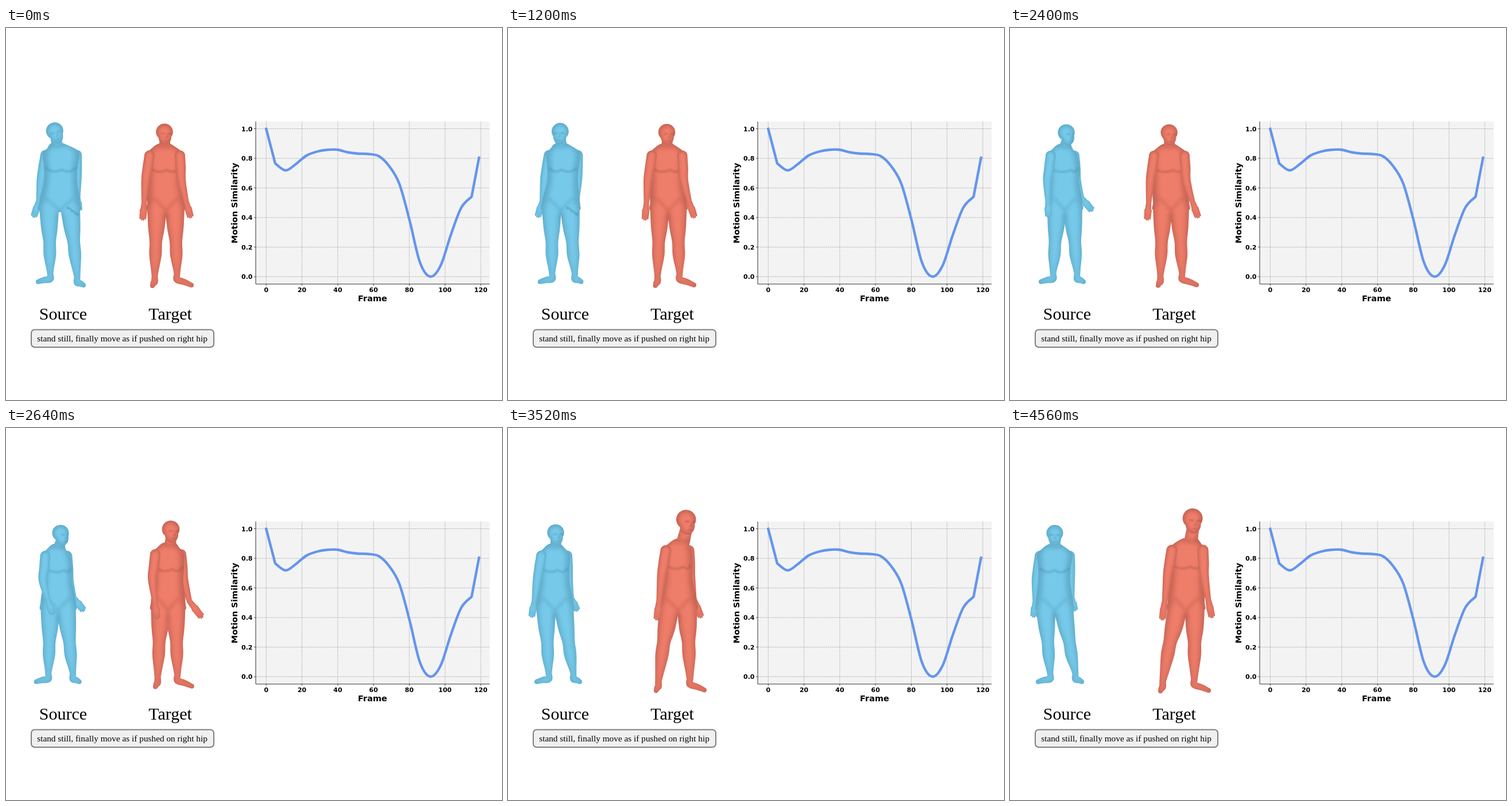
Animation, 864 px wide and 648 px high, one loop 4.8 s. Source, as an HTML page with a canvas:

```html
<!DOCTYPE html>
<html lang="en">
<head>
<meta charset="utf-8">
<title>Motion similarity</title>
<style>
html, body { margin: 0; width: 100%; height: 100%; overflow: hidden; background: #fff; }
canvas, svg { position: absolute; left: 0; top: 0; width: 864px; height: 648px; }
.tick { font: bold 11px "DejaVu Sans", sans-serif; }
.axis { font: bold 14.5px "DejaVu Sans", sans-serif; }
.name { font: 30px "Liberation Serif", serif; }
.note { font: 15.3px "Liberation Serif", serif; }
</style>
</head>
<body>
<canvas id="stage" width="864" height="648"></canvas>
<svg id="chart" viewBox="0 0 864 648"></svg>
<script>
const LOOP = 4800, STEP = 80;
const ctx = document.getElementById('stage').getContext('2d');
const lerp = (a, b, u) => a + (b - a) * u;

// ---------- chart and captions ----------
// curve heights at even steps between its two straight ends
const HEIGHTS = [236, 248, 237, 222.5, 215.5, 212.3, 212, 216.5, 218.8, 219.5,
  223, 240, 271, 335, 408, 433, 414, 360, 313, 294];

function smooth(pts) {
  return pts.slice(1).map((b, i) => {
    const a = pts[i], p = pts[i - 1] || a, n = pts[i + 2] || b;
    return `C${a[0] + (b[0] - p[0]) / 6} ${a[1] + (b[1] - p[1]) / 6} ` +
      `${b[0] - (n[0] - a[0]) / 6} ${b[1] - (n[1] - a[1]) / 6} ${b[0]} ${b[1]}`;
  }).join('');
}

function buildChart() {
  const text = (cls, x, y, s, anchor = 'middle', extra = '') =>
    `<text class="${cls}" x="${x}" y="${y}" text-anchor="${anchor}" ${extra}>${s}</text>`;
  const line = (d, color, w, extra = '') =>
    `<path d="${d}" fill="none" stroke="${color}" stroke-width="${w}" ${extra}/>`;
  const grid = d => line(d, '#aaa', .8, 'stroke-dasharray="2.6 1.1"');
  let s = '<rect x="435" y="163" width="407.5" height="283" fill="#f3f3f3"/>';
  for (let i = 0; i < 7; i++) {
    const x = 453.3 + 62.3 * i;
    s += grid(`M${x} 446V163`) + line(`M${x} 446v3`, '#222', .8) + text('tick', x, 460, i * 20);
  }
  for (let i = 0; i < 6; i++) {
    const y = 433.2 - 51.54 * i;
    s += grid(`M435 ${y}H842.5`) + line(`M435 ${y}h-3`, '#222', .8) +
      text('tick', 429.5, y + 4, (i / 5).toFixed(1), 'end');
  }
  s += line('M435 163V446H842.5', '#333', 1);
  s += line('M453.3 175.7L469 236' + smooth(HEIGHTS.map((y, i) => [469 + 18 * i, y])) + 'L824 226',
    '#6495ed', 4.4, 'stroke-linecap="square" stroke-linejoin="round"');
  s += text('axis', 638.5, 476, 'Frame');
  s += text('axis', 0, 0, 'Motion Similarity', 'middle', 'transform="translate(403 305) rotate(-90)"');
  s += text('name', 99.5, 508, 'Source') + text('name', 286, 508, 'Target');
  s += '<rect x="44" y="525.5" width="318" height="30.5" rx="6" fill="#f0f0f0" stroke="#7f7f7f" stroke-width="2"/>';
  s += text('note', 202.5, 546, 'stand still, finally move as if pushed on right hip');
  document.getElementById('chart').innerHTML = s;
}

// ---------- poses ----------
// time, head x, head y, yaw, then left and right x of shoulders, hips, fingertips, ankles
const BLUE = {
  rim: '#60acca', core: '#77c9ea', dark: '#34758f',
  handY: [330, 319], ankleY: 428, toe: [-21, 14, 11, 14],
  keys: [
    [0, 86, 183, .1, 64, 128, 58, 129, 48, 127, 77, 124],
    [720, 83, 184, -.6, 58, 119, 53, 118, 45, 112, 75, 115],
    [1760, 100, 184, .1, 76, 135, 66, 133, 59, 125, 79, 118],
    [2400, 98, 186, 1.2, 66, 117, 65, 126, 67, 144, 75, 117],
    [2960, 91, 188, 1.2, 60, 104, 54, 116, 101, 126, 72, 116],
    [3520, 83, 186, .6, 53, 108, 49, 114, 41, 121, 71, 114],
    [3920, 78, 187, 0, 47, 109, 45, 110, 41, 113, 70, 114]
  ]
};
const RED = {
  rim: '#c76556', core: '#ee7d69', dark: '#8a3c34', facing: true,
  handY: [335, 331], ankleY: 432, toe: [-4, 17, 25, 19],
  keys: [
    [0, 276, 185, .4, 245, 308, 246, 311, 238, 322, 259, 298],
    [2400, 277, 186, .6, 246, 309, 249, 312, 239, 328, 262, 300],
    [2960, 300, 173, .9, 267, 311, 257, 313, 296, 326, 267, 297],
    [3520, 310, 164, .9, 270, 320, 264, 329, 259, 337, 262, 317],
    [3920, 318, 162, .5, 277, 341, 275, 339, 265, 352, 266, 321]
  ]
};

function poseAt(keys, t) {
  const i = keys.findIndex(k => k[0] > t);
  if (i < 0) return keys[keys.length - 1];
  const a = keys[i - 1], b = keys[i];
  return a.map((v, j) => lerp(v, b[j], (t - a[0]) / (b[0] - a[0])));
}

// ---------- body ----------
const spline = (p, a, b, n, u) =>
  a + .5 * u * (b - p + u * (2 * p - 5 * a + 4 * b - n + u * (3 * (a - b) + n - p)));

// tapered tube through [x, y, radius] points
function tube(path, pts, k) {
  for (let i = 0; i < pts.length - 1; i++) {
    const p = pts[i - 1] || pts[i], a = pts[i], b = pts[i + 1], n = pts[i + 2] || b;
    for (let j = 0; j <= 20; j++) {
      const [x, y, r] = a.map((v, c) => spline(p[c], v, b[c], n[c], j / 20));
      path.moveTo(x + r * k, y);
      path.arc(x, y, r * k, 0, 7);
    }
  }
}

function arm(path, a, s, k) {
  const { sx, sy, ex, ey, tx, ty } = a;
  const wx = lerp(ex, tx, a.front ? .5 : .3), wy = lerp(ey, ty, .56);
  const px = lerp(wx, tx, .42), py = lerp(wy, ty, .42);
  tube(path, [[sx, sy, 9 * s], [lerp(sx, ex, .5), lerp(sy, ey, .5), 8.8 * s], [ex, ey, 7.6 * s], [wx, wy, 4.6 * s]], k);
  tube(path, [[wx, wy, 4.6 * s], [px, py, 5.6 * s]], k);
  const len = Math.hypot(tx - wx, ty - wy);
  const nx = (wy - ty) / len, ny = (tx - wx) / len;
  for (let f = -1.5; f < 2; f++) {
    const cut = .12 * Math.abs(f), off = f * 3;
    tube(path, [[px + nx * off, py + ny * off, 2],
      [lerp(tx, px, cut) + nx * off, lerp(ty, py, cut) + ny * off, 1.4]], k);
  }
}

function leg(path, hx, ax, ay, dx, dy, s, k) {
  const knee = lerp(hx, ax, .5);
  tube(path, [[hx, 314, 17], [lerp(hx, knee, .5), 346, 14.5 * s], [knee, 372, 11 * s],
    [lerp(knee, ax, .35), 395, 10.8 * s], [lerp(knee, ax, .8), lerp(372, ay, .8), 7 * s], [ax, ay, 5.3 * s]], k);
  tube(path, [[ax, ay, 5.3 * s], [ax, ay + 9, 6], [ax + dx / 2, ay + 4 + dy / 2, 5.4], [ax + dx, ay + dy, 4]], k);
}

// rows of [left, right, height fraction], narrowed by k
function trunk(path, rows, top, k) {
  const side = (l, r, f, sign) => [(l + r) / 2 + sign * k * (r - l) / 2, lerp(top, 320, f)];
  const p = [...rows.map(r => side(...r, 1)), ...rows.map(r => side(...r, -1)).reverse()];
  const n = p.length, loop = [p[n - 1], ...p, p[0], p[1]];
  const shape = smooth(loop.slice(1, -1));
  path.addPath(new Path2D(`M${p[0][0]} ${p[0][1]}` + shape));
}

// rim tone first, then a soft lighter core inside it
function solid(build, tone, blur, details) {
  const full = new Path2D(), core = new Path2D();
  build(full, 1);
  build(core, .72);
  ctx.fillStyle = tone.rim;
  ctx.fill(full);
  ctx.save();
  ctx.clip(full);
  ctx.filter = `blur(${blur}px)`;
  ctx.fillStyle = tone.core;
  ctx.fill(core);
  if (details) details();
  ctx.restore();
}

function crease(tone, alpha, width, d) {
  ctx.save();
  ctx.globalAlpha = alpha;
  ctx.filter = `blur(${width * .6}px)`;
  ctx.strokeStyle = tone.dark;
  ctx.lineWidth = width;
  ctx.lineCap = 'round';
  ctx.stroke(new Path2D(d));
  ctx.restore();
}

function head(x, y, tilt, yaw, s, tone) {
  ctx.save();
  ctx.translate(x, y);
  ctx.rotate(tilt);
  ctx.scale(s, s);
  const jaw = yaw * 2.5, f = yaw * 8;
  solid((p, k) => {
    p.ellipse(0, -4, 14.8 * k, 14.5 * k, 0, 0, 7);
    p.moveTo(jaw + 11 * k, 5);
    p.ellipse(jaw, 5, 11.2 * k, 13.5 * k, 0, 0, 7);
  }, tone, 3, () => {
    crease(tone, .4, 2, `M${f - 8} -1h5m6 0h5`);
    crease(tone, .4, 1.4, `M${f + 1.5} 1v5h-3m-2 5h7`);
  });
  ctx.restore();
}

function figure(tone, t) {
  const [, hx, hy, yaw, sl, sr, hl, hr, tl, tr0, al, ar] = poseAt(tone.keys, t);
  const red = tone.facing;
  // the far arm swings wide while the body turns
  const tr = tr0 + (red ? 20 * Math.exp(-(((t - 2720) / 150) ** 2)) : 0);
  const tilt = red ? .05 * yaw : -.3 * Math.max(0, 1 - t / 720);
  const s = 1 + (185 - hy) * .008, limb = 1 + (s - 1) * .4;
  const top = 205 + (hy - 185) * .4;
  const nx = lerp(hx, (sl + sr) / 2, .35), nw = 10 * s;
  const cl = sl + 2, cr = sr - 3 + 8 * Math.max(yaw - .3, 0), wr = lerp(cr, hr, .25) - 2;
  const elbow = top + 61;
  const [yl, yr] = tone.handY;

  const left = { sx: sl + 5, sy: top + 17, ex: sl - 1 + .12 * (tl - sl), ey: elbow,
    tx: tl, ty: yl - .25 * Math.max(0, tl - sl), front: red || yaw > .4 };
  const right = { sx: sr - 5, sy: top + 17, ex: sr - 4 + .12 * (tr - sr), ey: elbow,
    tx: tr, ty: yr, front: red && yaw < .7 };
  const drawArm = a => solid((p, k) => arm(p, a, limb, k), tone, 2.5);
  const arms = [left, right];
  arms.filter(a => !a.front).forEach(drawArm);

  const rows = [[nx - nw, nx + nw, -.03], [sl + 7, sr - 7, .055], [sl, sr, .13], [cl, cr, .33],
    [cl, wr, .55], [hl, hr, .85], [hl + 4, hr - 4, .99]];
  const ay = tone.ankleY + (red ? (185 - hy) * .4 : 0);
  const ry = red ? ay - 3 : ay + Math.max(0, ar - 118);
  const [lx, ly, rx, rdy] = tone.toe;
  solid((p, k) => {
    trunk(p, rows, top, k);
    leg(p, hr - 17, ar, ry, rx, rdy, limb, k);
    leg(p, hl + 17, al, ay, lx, ly, limb, k);
    tube(p, [[hx + 1, hy + 9 * s, 9 * s], [nx, top + 3, nw]], k);
  }, tone, 4, () => {
    const by = lerp(top, 320, .375), mid = (cl + cr) / 2 + 10 * yaw, cx = (hl + hr) / 2;
    crease(tone, .32, 3, `M${cl + 4} ${by - 4}Q${(cl + mid) / 2} ${by + 7} ${mid} ${by - 1}` +
      `Q${(cr + mid) / 2} ${by + 7} ${cr - 4} ${by - 4}`);
    crease(tone, .22, 4, `M${hl + 13} 297L${cx} 318L${hr - 13} 297M${cx} 318v18`);
    crease(tone, .35, 6, `M${nx - nw} ${top - 1}q${nw} 5 ${2 * nw} 0`);
  });

  // fingertips poking through the thigh
  if (!red && t < 2000) {
    let d = '';
    for (let i = 0; i < 9; i++) d += `M${hr - 22 + i * 7 % 19} ${312 + i * 5 % 14}l${2 * Math.cos(i)} 2`;
    crease(tone, .75, 1.4, d);
  }
  arms.filter(a => a.front).forEach(drawArm);
  head(hx, hy, tilt, yaw, s, tone);
}

function draw(now) {
  let t = Math.floor(now % LOOP / STEP) * STEP;
  if (t > 3840 && t < 4480) t = 3840;
  ctx.clearRect(0, 0, 864, 648);
  figure(BLUE, t);
  figure(RED, t);
}

function tick() {
  draw(performance.now());
  requestAnimationFrame(tick);
}

buildChart();
tick();
</script>
</body>
</html>
```
